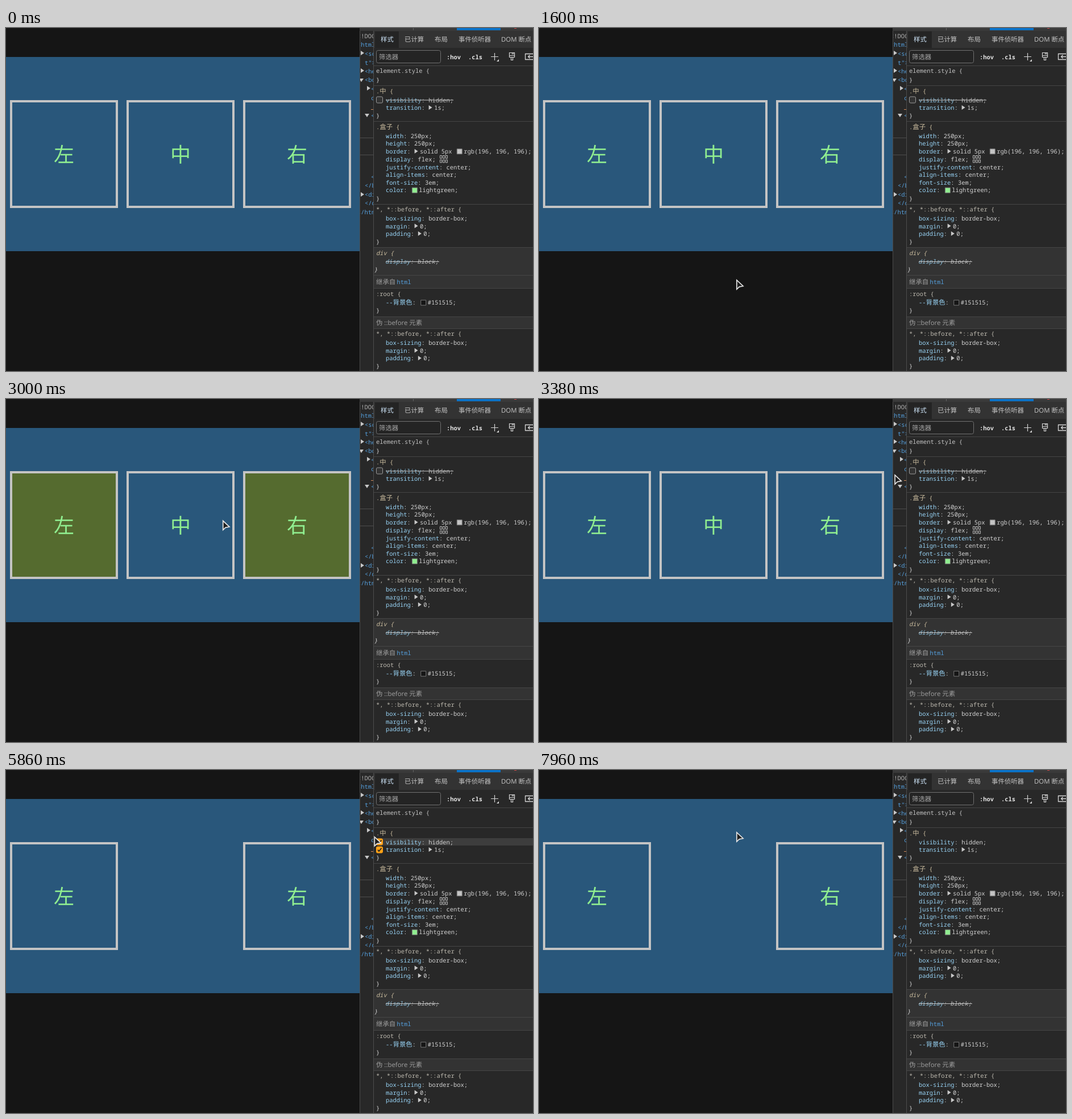
Animation, 927 px wide and 604 px high, one loop 8000 ms. Source, as an HTML page with a canvas:

```html
<!DOCTYPE html>
<html lang="zh-CN">
<head>
<meta charset="utf-8">
<style>
html, body { margin: 0; width: 100%; height: 100%; overflow: hidden; background: #151515; }
canvas { display: block; }
</style>
</head>
<body>
<canvas width="927" height="604"></canvas>
<script>
const ctx = document.querySelector('canvas').getContext('2d');
const LOOP = 8000, CLICK = 3890, HIDDEN = 5020;
const CJK = '"Noto Sans CJK SC", sans-serif';
const MONO = '10.44px "Noto Sans Mono", monospace';
const SANS = '11.4px "Open Sans", sans-serif';
const NAME = '#98d3f5', VALUE = '#d2d2d2', TAG = '#559fdc', TAN = '#cbbd9f', RULE = '#bcb8ae', GREY = '#a0a0a0';

// Pointer keys: time, x, y
const KEYS = [
  [380, 393, 521], [480, 377, 440], [580, 364, 350], [680, 352, 275], [750, 347, 255],
  [1220, 347, 255], [1330, 354, 300], [1460, 356, 385], [1600, 347, 443],
  [2070, 347, 443], [2200, 352, 385], [2340, 350, 294], [2480, 358, 240],
  [2820, 358, 240], [2960, 374, 225], [3090, 410, 183], [3240, 540, 145], [3380, 625, 133], [3660, 650, 122],
  [3710, 650, 122], [3890, 651, 120], [4030, 652, 122], [4220, 653, 122], [4360, 654, 122],
  [5810, 654, 122], [5860, 648, 117], [6000, 560, 95], [6150, 440, 87], [6300, 325, 140], [6440, 275, 215],
  [6550, 320, 275], [6650, 348, 232], [6800, 300, 171], [6930, 241, 207], [7060, 275, 252], [7200, 345, 235],
  [7300, 335, 187], [7400, 275, 175], [7500, 238, 215], [7600, 262, 253], [7750, 345, 245], [7850, 374, 180],
  [7960, 347, 109], [8000, 347, 109]
];

function slope(i, axis) {
  const [a, b, c] = [KEYS[i - 1], KEYS[i], KEYS[i + 1]];
  const same = (p, q) => p[1] === q[1] && p[2] === q[2];
  if (!a || !c || same(a, b) || same(b, c)) return 0;
  return (c[axis] - a[axis]) / (c[0] - a[0]);
}

function pointerAt(t) {
  const i = KEYS.findIndex(k => k[0] > t) - 1;
  if (i < 0) return null;
  const a = KEYS[i], b = KEYS[i + 1], d = b[0] - a[0], u = (t - a[0]) / d;
  return [1, 2].map(n => {
    const rise = b[n] - a[n], m0 = slope(i, n) * d, m1 = slope(i + 1, n) * d;
    return a[n] + u * (m0 + u * (3 * rise - 2 * m0 - m1 + u * (m0 + m1 - 2 * rise)));
  });
}

function rect(x, y, w, h, color) {
  ctx.fillStyle = color;
  ctx.fillRect(x, y, w, h);
}

function shape(d, x, y, fill, stroke, width = 1) {
  const path = new Path2D(d);
  ctx.save();
  ctx.translate(x, y);
  if (fill) { ctx.fillStyle = fill; ctx.fill(path); }
  if (stroke) { ctx.strokeStyle = stroke; ctx.lineWidth = width; ctx.stroke(path); }
  ctx.restore();
}

function box(x, y, w, h, r, fill, stroke) {
  ctx.beginPath();
  ctx.roundRect(x, y, w, h, r);
  if (fill) { ctx.fillStyle = fill; ctx.fill(); }
  if (stroke) { ctx.strokeStyle = stroke; ctx.lineWidth = 1; ctx.stroke(); }
}

// Writes a line centred on y and returns where it ends
function write(text, x, y, color, font = MONO) {
  ctx.fillStyle = color;
  for (const run of text.match(/[一-鿿]+|[^一-鿿]+/g)) {
    ctx.font = /[一-鿿]/.test(run) ? '11.4px ' + CJK : font;
    ctx.fillText(run, x, y + 3.7);
    x += ctx.measureText(run).width;
  }
  return x;
}

const arrowRight = (x, y) => shape('M0-4L6 0 0 4Z', x, y, '#c8c8c8');
const arrowDown = (x, y) => shape('M-4-3H4L0 3Z', x, y, '#c8c8c8');

// Value parts: plain text, '▶' for an expander, '■colour' for a swatch
function declare(y, name, ...parts) {
  let x = write(name, 668, y, NAME);
  x = write(': ', x, y, VALUE);
  for (const part of parts) {
    if (part === '▶') {
      arrowRight(x + .5, y - .5);
      x += 10;
    } else if (part[0] === '■') {
      box(x + 2.5, y - 4.5, 9, 9, 0, part.slice(1), '#777');
      x += 14.5;
    } else x = write(part, x, y, VALUE);
  }
}

function strike(y, name, value) {
  ctx.globalAlpha = .85;
  declare(y, name, value);
  ctx.globalAlpha = 1;
  rect(668, y - .5, 6.264 * (name.length + value.length + 2), 1, '#c8c8c8');
}

function drawPage(t, hover) {
  rect(0, 0, 622, 604, '#151515');
  rect(0, 51, 622, 342, '#29577b');
  ctx.textAlign = 'center';
  ctx.font = '36px ' + CJK;
  [...'左中右'].forEach((char, i) => {
    if (i === 1 && t >= HIDDEN) return;
    const x = 7 + 205 * i;
    if (hover && i !== 1) rect(x, 127, 190, 190, '#556b2f');
    ctx.strokeStyle = '#c4c4c4';
    ctx.lineWidth = 4;
    ctx.strokeRect(x + 2, 129, 186, 186);
    ctx.fillStyle = 'lightgreen';
    ctx.fillText(char, x + 95, 236);
  });
  ctx.textAlign = 'left';
}

function drawTree() {
  rect(622, 0, 305, 604, '#282828');
  rect(622, 0, 1, 604, '#4a4a4a');
  ctx.save();
  ctx.beginPath();
  ctx.rect(623, 0, 23, 604);
  ctx.clip();
  write('<!DOCTYPE', 618, 14, '#b0b0b0');
  [['<html', 618, 29], ['<sc', 631, 45], ['t">', 631, 61], ['<he', 631, 76], ['<bo', 631, 91],
   ['<d', 642, 107], ['c', 642, 123], ['<d', 642, 154], ['</d', 642, 262], ['</b', 631, 277],
   ['<di', 631, 293], ['</d', 631, 308], ['</html', 618, 324]]
    .forEach(([text, x, y]) => write(text, x, y, TAG));
  rect(642, 143, 5, 1, '#d08a5a');
  for (const y of [193, 223]) rect(623, y, 24, 1, '#4d4d4d');
  for (const y of [44, 75, 293]) arrowRight(624, y);
  arrowRight(635, 106);
  arrowDown(625, 92);
  arrowDown(635, 154);
  ctx.restore();
  rect(646, 0, 1, 604, '#4d4d4d');
}

function drawToolbar() {
  rect(647, 0, 280, 35, '#333');
  rect(622, 0, 305, 5, '#3a3a3a');
  rect(716, 0, 1, 4, '#606060');
  rect(793, 0, 77, 4, '#0a72c8');
  rect(894, 0, 4, 1, '#d04848');
  rect(649, 6, 42, 29, '#242424');
  write('样式', 659, 20, '#cfe6fa', SANS);
  [['已计算', 701], ['布局', 754], ['事件侦听器', 796], ['DOM 断点', 871]]
    .forEach(([label, x]) => write(label, x, 20, '#c6c6c6', SANS));
  box(651.5, 39.5, 113, 22, 3, '#242424', '#707070');
  write('筛选器', 656, 51, '#a8a8a8', SANS);
  write(':hov', 775, 51, '#e4e4e4', 'bold ' + MONO);
  write('.cls', 813, 51, '#e4e4e4', 'bold ' + MONO);
  shape('M0 6.5H13M6.5 0V13', 853, 44, null, '#d4d4d4', 1.2);
  shape('M4 0V4H0Z', 863, 55, '#d4d4d4');
  shape('M0 0H9V8H0ZM0 5H9M3 8V13H6V8M5 0V3M7 0V3', 885.5, 43.5, null, '#d4d4d4', 1.2);
  shape('M16 0H0V10H16M14 5H5M8 2L5 5 8 8', 913.5, 45.5, null, '#d4d4d4', 1.3);
}

function universalRule(y) {
  write('*, *::before, *::after {', 651, y, RULE);
  declare(y + 15.5, 'box-sizing', 'border-box;');
  declare(y + 29.5, 'margin', '▶', '0;');
  declare(y + 43, 'padding', '▶', '0;');
}

function checkbox(y, checked) {
  box(651.5, y - 5.5, 11, 11, 2, checked ? '#ffa116' : '#333', checked ? '#ffa116' : '#9a9a9a');
  if (checked) shape('M-3 0L-1 2.5 3.5-3', 657, y, null, '#222', 1.8);
}

function drawStyles(clicked, hover) {
  rect(647, 387, 280, 72, '#333');
  rect(647, 508, 280, 21, '#333');
  for (const y of [66, 101, 164, 310, 386, 435, 458, 508, 529]) rect(647, y, 280, 1, '#454545');
  for (const y of [91, 154, 300, 376, 497, 595]) write('}', 651, y, VALUE);

  write('element.style {', 651, 75, '#c4c4c4');
  write('.中 {', 651, 111, TAN);
  if (hover) rect(647, 120, 280, 13, '#3d3d3d');
  if (clicked) declare(127, 'visibility', 'hidden;');
  else strike(127, 'visibility', 'hidden;');
  declare(140.5, 'transition', '▶', '1s;');
  if (hover || !clicked) checkbox(126.5, clicked);
  if (hover) checkbox(140.5, true);

  write('.盒子 {', 651, 174, TAN);
  declare(190, 'width', '250px;');
  declare(203.7, 'height', '250px;');
  declare(217.4, 'border', '▶', 'solid 5px ', '■#c4c4c4', 'rgb(196, 196, 196);');
  declare(231, 'display', 'flex;');
  for (const x of [763, 768, 773])
    for (const y of [224, 231.5]) shape('M0 0H3V5H0Z', x + .5, y + .5, null, '#b8b8b8');
  declare(244.8, 'justify-content', 'center;');
  declare(258.4, 'align-items', 'center;');
  declare(272, 'font-size', '3em;');
  declare(285.7, 'color', '■lightgreen', 'lightgreen;');

  universalRule(319.5);
  write('div {', 651, 396, TAN, 'italic ' + MONO);
  ctx.save();
  ctx.transform(1, 0, -.2, 1, 82.2, 0);
  strike(411.5, 'display', 'block;');
  write('}', 651, 425, VALUE);
  ctx.restore();
  write('继承自', 651, 447, GREY, SANS);
  write('html', 687.5, 447.5, TAG);
  write(':root {', 651, 468, RULE);
  declare(483.7, '--背景色', '■#151515', '#151515;');
  write('伪 ::before 元素', 651, 519, GREY, SANS);
  universalRule(538.7);
}

function draw(t) {
  const pointer = pointerAt(t);
  const [x, y] = pointer || [-99, -99];
  const overMiddle = t < HIDDEN && x >= 212 && x < 402 && y >= 127 && y < 317;
  ctx.textRendering = 'geometricPrecision';
  drawPage(t, overMiddle);
  drawTree();
  drawToolbar();
  drawStyles(t >= CLICK, x >= 647 && y > 101 && y < 160);
  if (pointer) shape('M.8 1V17L5.2 12.8 12 11.5Z', x, y, '#202020', '#e4e4e4', 1.7);
}

function tick(now) {
  draw(now % LOOP);
  requestAnimationFrame(tick);
}
requestAnimationFrame(tick);
</script>
</body>
</html>
```
